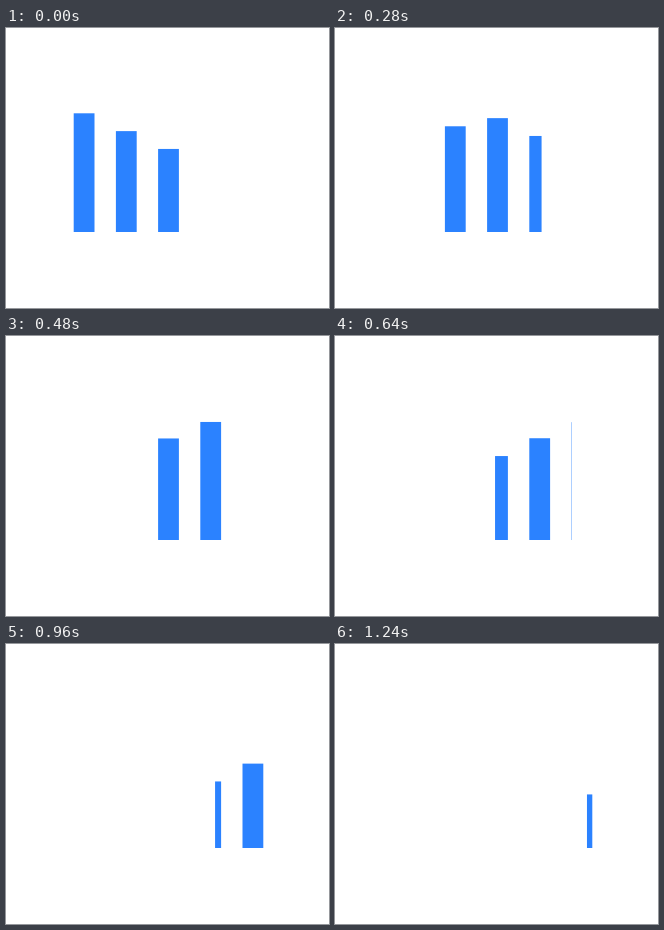
An HTML page with a canvas that plays this animation: 323x280 px, repeating every 1.28 s.

```html
<!DOCTYPE html>
<html lang="en">
<head>
<meta charset="utf-8">
<title>Bar wave</title>
<style>
  html, body { margin: 0; width: 100%; height: 100%; overflow: hidden; background: #fff; }
  canvas { display: block; }
</style>
</head>
<body>
<canvas id="stage" width="323" height="280"></canvas>
<script>
const ctx = document.getElementById('stage').getContext('2d');
const LOOP = 1280, STEP = 40;
const BARS = 5, FIRST_X = 67.7, PITCH = 42.2, WIDTH = 20.8;
const BASE = 204, PEAK = 118.7, SLOPE = 0.11, PEAK_DELAY = 162;

function draw(t) {
  ctx.fillStyle = '#fff';
  ctx.fillRect(0, 0, 323, 280);
  ctx.fillStyle = '#2b82ff';

  // Bars show only inside a window whose two edges travel right at different speeds.
  const windowLeft = 62 + 0.1532 * t;
  const windowRight = 183 + 0.0842 * t;

  for (let i = 0; i < BARS; i++) {
    const x = FIRST_X + i * PITCH;
    const left = Math.max(x, windowLeft);
    const right = Math.min(x + WIDTH, windowRight);
    const height = PEAK - SLOPE * Math.abs(t - i * PEAK_DELAY);
    if (right > left) ctx.fillRect(left, BASE - height, right - left, height);
  }
}

const start = performance.now();
function tick() {
  const t = (performance.now() - start) % LOOP;
  draw(Math.floor(t / STEP) * STEP);
  requestAnimationFrame(tick);
}
tick();
</script>
</body>
</html>
```
